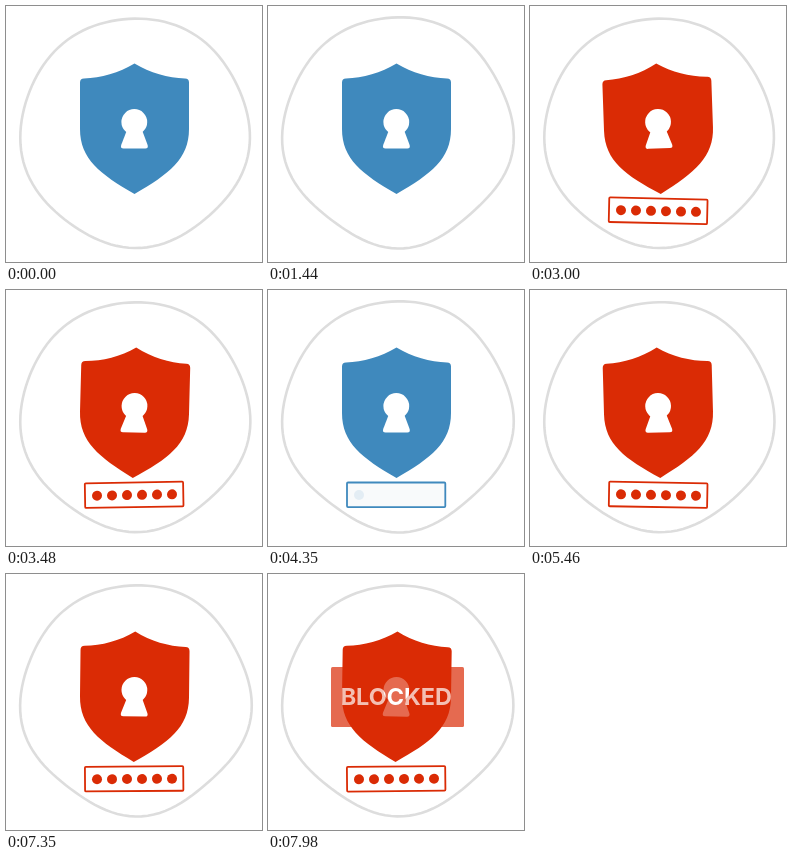
Animation of 256x256 px, one loop 8000 ms. Source, as an HTML page:

```html
<!DOCTYPE html>
<html lang="en">
<head>
<meta charset="utf-8">
<title>Blocked login</title>
<style>
  html, body { margin: 0; width: 100%; height: 100%; overflow: hidden; background: #fff; }
  svg { display: block; width: 100vw; height: 100vh; }
  text { font: 700 23.4px Inter, "Liberation Sans", sans-serif; }
</style>
</head>
<body>
<svg viewBox="0 0 256 256">
  <path id="ring" fill="none" stroke="#dddddd" stroke-width="2.6"/>
  <g id="shield">
    <path id="plate" d="M128.5 57.5 C113 67 95 72 78 72.4 Q74 72.5 74 76.5 V123 C74 153 94 168 128.5 188
      C163 168 183 153 183 123 V76.5 Q183 72.5 179 72.4 C162 72 144 67 128.5 57.5Z"/>
    <circle cx="128.3" cy="116" r="12.9" fill="#fff"/>
    <path d="M121 124 L115.2 139 Q114.2 142.5 117.5 142.5 H139.3 Q142.6 142.5 141.6 139 L136 124Z" fill="#fff"/>
  </g>
  <g id="field">
    <rect id="frame" x="79" y="192.5" width="98.3" height="24.6" rx="1" stroke-width="1.8"/>
    <g id="dots"></g>
  </g>
  <g id="banner">
    <rect x="63" y="93" width="133" height="60" rx="1.5" fill="#da2b05"/>
    <text x="128.3" y="130.8" text-anchor="middle" fill="#fff">BLOCKED</text>
  </g>
</svg>
<script>
  const LOOP = 8000, DRIFT = 3000;
  const BLUE = [63, 137, 189], RED = [218, 43, 5];
  const FIRST = 2190, EVERY = 2130, TRIES = 3;
  const TAU = 2 * Math.PI;

  const $ = id => document.getElementById(id);
  const clamp = x => Math.max(0, Math.min(1, x));
  const ramp = (t, from, span) => clamp((t - from) / span);
  const mix = (a, b, k) => a + (b - a) * k;
  const smooth = k => k * k * (3 - 2 * k);
  const rgb = (a, b, k) => `rgb(${a.map((v, i) => Math.round(mix(v, b[i], k)))})`;

  const dots = Array.from({ length: 6 }, (_, i) => {
    const c = document.createElementNS("http://www.w3.org/2000/svg", "circle");
    c.setAttribute("cx", 91 + 15 * i);
    c.setAttribute("cy", 205);
    c.setAttribute("r", 5);
    $("dots").append(c);
    return c;
  });

  // an uneven circle: waves with five and four lobes on its radius
  function ringPath(k) {
    const cx = mix(128.8, 129.5, k), cy = mix(126.2, 125.2, k);
    const five = mix(1.2, 1.8, k), four = mix(0.9, 1.8, k);
    const pts = [];
    for (let deg = 0; deg < 360; deg += 3) {
      const a = deg * TAU / 360;
      const r = 113.8 + five * Math.cos(5 * a - 1.3) + four * Math.cos(4 * a);
      pts.push(`${(cx + r * Math.cos(a)).toFixed(2)} ${(cy + r * Math.sin(a)).toFixed(2)}`);
    }
    return `M${pts.join("L")}Z`;
  }

  // three swings of 300 ms that die out at the end
  function tiltAt(s) {
    const u = ramp(s, 735, 900);
    return -2 * Math.sin(3 * TAU * u) * (1 - u ** 6);
  }

  function render(t) {
    $("ring").setAttribute("d", ringPath((1 - Math.cos(TAU * t / DRIFT)) / 2));

    const n = Math.max(0, Math.min(TRIES - 1, Math.floor((t - FIRST) / EVERY)));
    const s = t - FIRST - n * EVERY;
    const last = n === TRIES - 1;
    const clear = last ? 0 : ramp(s, 1480, 160);
    const alarm = smooth(ramp(s, 640, 120)) * (1 - clear);
    const color = rgb(BLUE, RED, alarm);
    const tilt = tiltAt(s);

    $("plate").setAttribute("fill", color);
    $("shield").setAttribute("transform", `rotate(${tilt} 128.5 123)`);
    $("field").setAttribute("transform", `rotate(${-tilt * 0.65} 128.2 204.8)`);
    $("field").setAttribute("opacity", smooth(ramp(t, 1680, 300)));
    $("frame").setAttribute("stroke", color);
    $("frame").setAttribute("fill", rgb([248, 250, 251], [255, 255, 255], alarm));
    $("dots").setAttribute("fill", color);
    dots.forEach((dot, i) => dot.setAttribute("opacity", ramp(s, 20 + 100 * i, 100) * (1 - clear)));
    $("banner").setAttribute("opacity", last ? ramp(s, 1430, 145) : 0);
  }

  const begin = performance.now();
  function tick() {
    render((performance.now() - begin) % LOOP);
    requestAnimationFrame(tick);
  }
  tick();
</script>
</body>
</html>
```
